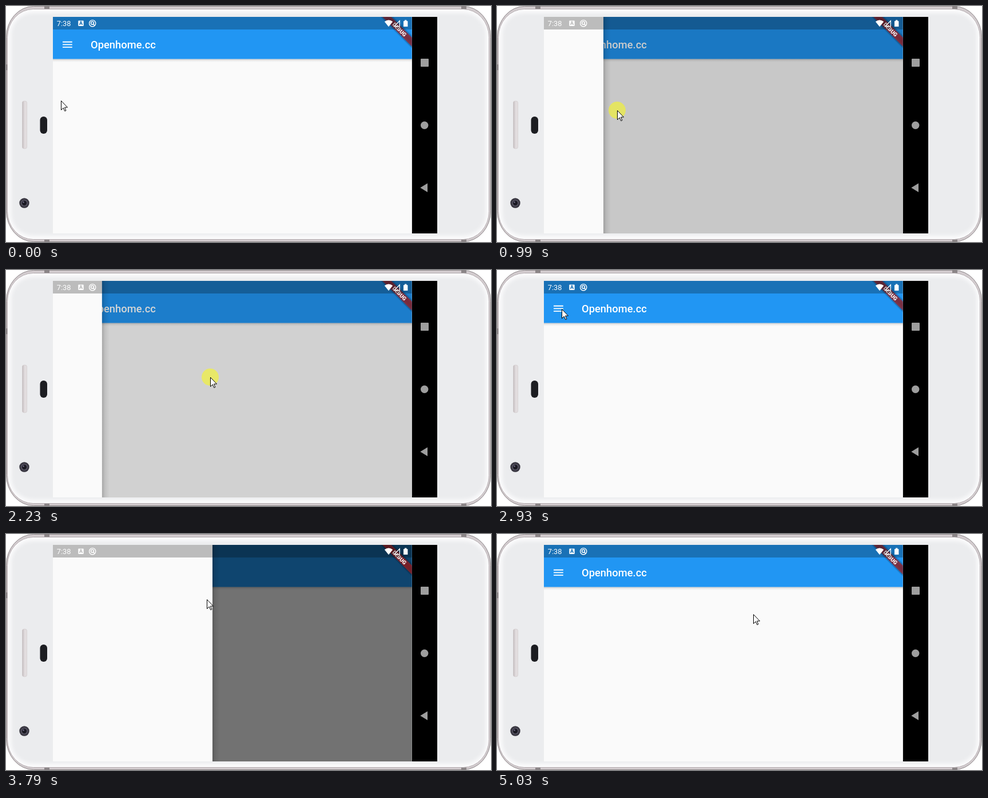
Animation, 848 px wide and 412 px high, one loop 5.1 s. Source, as an HTML page:

```html
<!DOCTYPE html>
<html lang="en">
<head>
<meta charset="utf-8">
<title>Drawer demo</title>
<style>
  html, body { margin: 0; width: 100%; height: 100%; overflow: hidden; background: #fff; }
  svg { display: block; width: 848px; height: 412px; }
  text { font-family: Roboto, "Open Sans", sans-serif; }
</style>
</head>
<body>
<svg viewBox="0 0 848 412" xmlns="http://www.w3.org/2000/svg">
  <defs>
    <clipPath id="appClip"><rect x="82" y="19" width="627.7" height="378"/></clipPath>
    <clipPath id="bodyClip"><rect width="848" height="412" rx="48" ry="54"/></clipPath>
    <linearGradient id="barShadow" x2="0" y2="1">
      <stop offset="0" stop-opacity=".22"/>
      <stop offset=".4" stop-opacity=".07"/>
      <stop offset="1" stop-opacity="0"/>
    </linearGradient>
    <linearGradient id="drawerShadow">
      <stop offset="0" stop-opacity=".2"/>
      <stop offset=".4" stop-opacity=".08"/>
      <stop offset="1" stop-opacity="0"/>
    </linearGradient>
    <linearGradient id="speaker">
      <stop offset="0" stop-color="#bdb6b8"/>
      <stop offset=".4" stop-color="#ded8da"/>
      <stop offset="1" stop-color="#e6e2e3"/>
    </linearGradient>
    <filter id="soft" x="-20%" y="-20%" width="140%" height="140%"><feGaussianBlur stdDeviation="3"/></filter>
    <mask id="letterCut">
      <rect x="120" y="20" width="24" height="22" fill="#fff"/>
      <path d="M128.4 33 131 27 133.6 33M129.3 31.2H132.7" fill="none" stroke="#000" stroke-width="1.3"/>
    </mask>
  </defs>

  <g id="phone">
    <rect x=".5" y=".5" width="847" height="411" rx="48" ry="54" fill="#d3cccf" stroke="#8f898b"/>
    <g clip-path="url(#bodyClip)" fill="#8b8587">
      <rect x="67" y="0" width="9" height="6"/>
      <rect x="796" y="0" width="9" height="6"/>
      <rect x="67" y="407" width="9" height="5"/>
      <rect x="796" y="407" width="9" height="5"/>
      <rect x="0" y="102" width="3" height="10"/>
    </g>
    <rect x="2.5" y="5.5" width="842" height="402" rx="45" ry="49" fill="#fbfbfc" stroke="#b3abae"/>
    <rect x="9" y="12" width="830" height="389" rx="38" fill="#ebecee" filter="url(#soft)"/>
    <rect x="28.5" y="166" width="8" height="83" rx="3" fill="url(#speaker)" stroke="#cfc9cb" stroke-width=".7"/>
    <rect x="59.5" y="193" width="12.5" height="30" rx="6" fill="#1c1d21"/>
    <circle cx="32" cy="344" r="8.7" fill="#383640"/>
    <circle cx="32" cy="344" r="6" fill="#565362"/>
    <circle cx="32" cy="344" r="4.2" fill="#1a1922"/>
    <circle cx="30.5" cy="342.5" r="1.2" fill="#74708c"/>
  </g>

  <rect x="709.7" y="19" width="44.3" height="378"/>
  <g fill="#9e9e9e">
    <rect x="725" y="92" width="14" height="14" rx="1"/>
    <circle cx="731.7" cy="208.2" r="6.7"/>
    <path d="M724.3 317.3 737 309.6V325Z"/>
  </g>

  <g clip-path="url(#appClip)">
    <rect x="82" y="19" width="628" height="378" fill="#fafafa"/>
    <rect x="82" y="92.5" width="628" height="5.5" fill="url(#barShadow)"/>
    <rect x="82" y="19" width="628" height="73.5" fill="#2196f3"/>
    <path d="M99 62.7H115.8M99 67.3H115.8M99 71.9H115.8" stroke="#fff" stroke-width="1.85"/>
    <text x="148" y="74" font-size="18.36" font-weight="500" fill="#fff">Openhome.cc</text>
    <rect id="scrim" x="82" y="19" width="628" height="378"/>
    <g id="drawer">
      <rect x="361" y="19" width="13" height="378" fill="url(#drawerShadow)"/>
      <rect x="82" y="19" width="279" height="378" fill="#fafafa"/>
    </g>
    <g transform="translate(710 19) rotate(45)">
      <rect x="-60" y="25.7" width="120" height="11" opacity=".5" filter="url(#soft)"/>
      <rect x="-60" y="25.7" width="120" height="11" fill="#b71c1c" fill-opacity=".63"/>
      <text y="34.6" font-size="9.4" font-weight="900" text-anchor="middle" fill="#fff">DEBUG</text>
    </g>
    <rect x="82" y="19" width="628" height="22" fill-opacity=".25"/>
    <g fill="#fff">
      <text x="88.7" y="35" font-size="12.85">7:38</text>
      <rect x="126.3" y="25.4" width="9.4" height="9.6" rx="1" mask="url(#letterCut)"/>
      <g fill="none" stroke="#fff" stroke-width="1.4">
        <circle cx="151.2" cy="30.2" r="5.6"/>
        <circle cx="151" cy="29.8" r="2.5"/>
        <path d="M152 31 155.2 34.2"/>
      </g>
      <path d="M669 36.2 661.8 27.2Q669 21.6 676.2 27.2Z"/>
      <path d="M688.3 25.8V35.7H678.6Z" fill="none" stroke="#fff" stroke-width="1.3"/>
      <path d="M695 26.2H697V24.6H700.4V26.2H702.4V36H695Z"/>
    </g>
  </g>

  <g id="pointer">
    <circle id="press" r="15" fill="#ff0" fill-opacity=".5"/>
    <path d="M.5.5V16.5L4.2 12.9 6.8 18.5 8.9 17.6 6.5 12H11.5Z" fill="#fff" stroke="#000"/>
  </g>
</svg>
<script>
const LOOP = 5100, STEPS = 66, STEP_MS = LOOP / STEPS;
const DRAWER_WIDTH = 279, SCRIM = 0.54, DRAG_SLOP = 24;
const byId = id => document.getElementById(id);
const scrim = byId('scrim'), drawer = byId('drawer'), pointer = byId('pointer'), press = byId('press');
const clamp = v => Math.min(1, Math.max(0, v));

// Pointer gestures, timed in steps
const origin = { x: 96, y: 165 };
const moves = [
  { from: 0, to: 3, x: 87, y: 171 },
  { from: 4, to: 5, x: 82, y: 175 },
  { from: 5, to: 18, x: 670, y: 209, power: 3.14, held: true },
  { from: 19, to: 22, x: 574, y: 204 },
  { from: 24, to: 31, x: 270, y: 180, held: true },
  { from: 31, to: 38, x: 113, y: 68 },
  { from: 41, to: 43, x: 113, y: 68, held: true },
  { from: 43, to: 49, x: 351, y: 114 },
  { from: 50, to: 53, x: 442, y: 143 },
  { from: 57, to: 58, x: 442, y: 143, held: true },
  { from: 63, to: 65, x: 448, y: 140 }
];
const MENU_TAP = 43, SCRIM_TAP = 58.33;

function pointerAt(step) {
  return moves.reduce((p, m) => {
    const k = clamp((step - m.from) / (m.to - m.from)) ** (m.power || 1);
    return { x: p.x + (m.x - p.x) * k, y: p.y + (m.y - p.y) * k };
  }, origin);
}

// Critically damped spring: distance left after a number of steps
function remaining(steps) {
  const s = Math.max(0, steps) * STEP_MS / 1000, omega = Math.sqrt(500);
  const left = (1 + (omega - 1) * s) * Math.exp(-omega * s);
  return left < 0.004 ? 0 : left;
}

function openness(step, x) {
  if (step < 23) return clamp((x - 82 - DRAG_SLOP) / DRAWER_WIDTH);
  if (step < MENU_TAP) return clamp(1 + (x - 574 + DRAG_SLOP) / DRAWER_WIDTH);
  return step < SCRIM_TAP ? 1 - remaining(step - MENU_TAP) : remaining(step - SCRIM_TAP);
}

function draw(time) {
  const step = Math.floor(time / STEP_MS + 0.25);
  const { x, y } = pointerAt(step);
  const open = openness(step, x);
  scrim.setAttribute('fill-opacity', SCRIM * open);
  drawer.setAttribute('transform', `translate(${(open - 1) * DRAWER_WIDTH} 0)`);
  drawer.style.display = open > 0 ? '' : 'none';
  pointer.setAttribute('transform', `translate(${Math.round(x)} ${Math.round(y)})`);
  press.style.display = moves.some(m => m.held && step >= m.from && step < m.to) ? '' : 'none';
}

const start = performance.now();
function loop() {
  draw((performance.now() - start) % LOOP);
  requestAnimationFrame(loop);
}
loop();
</script>
</body>
</html>
```
